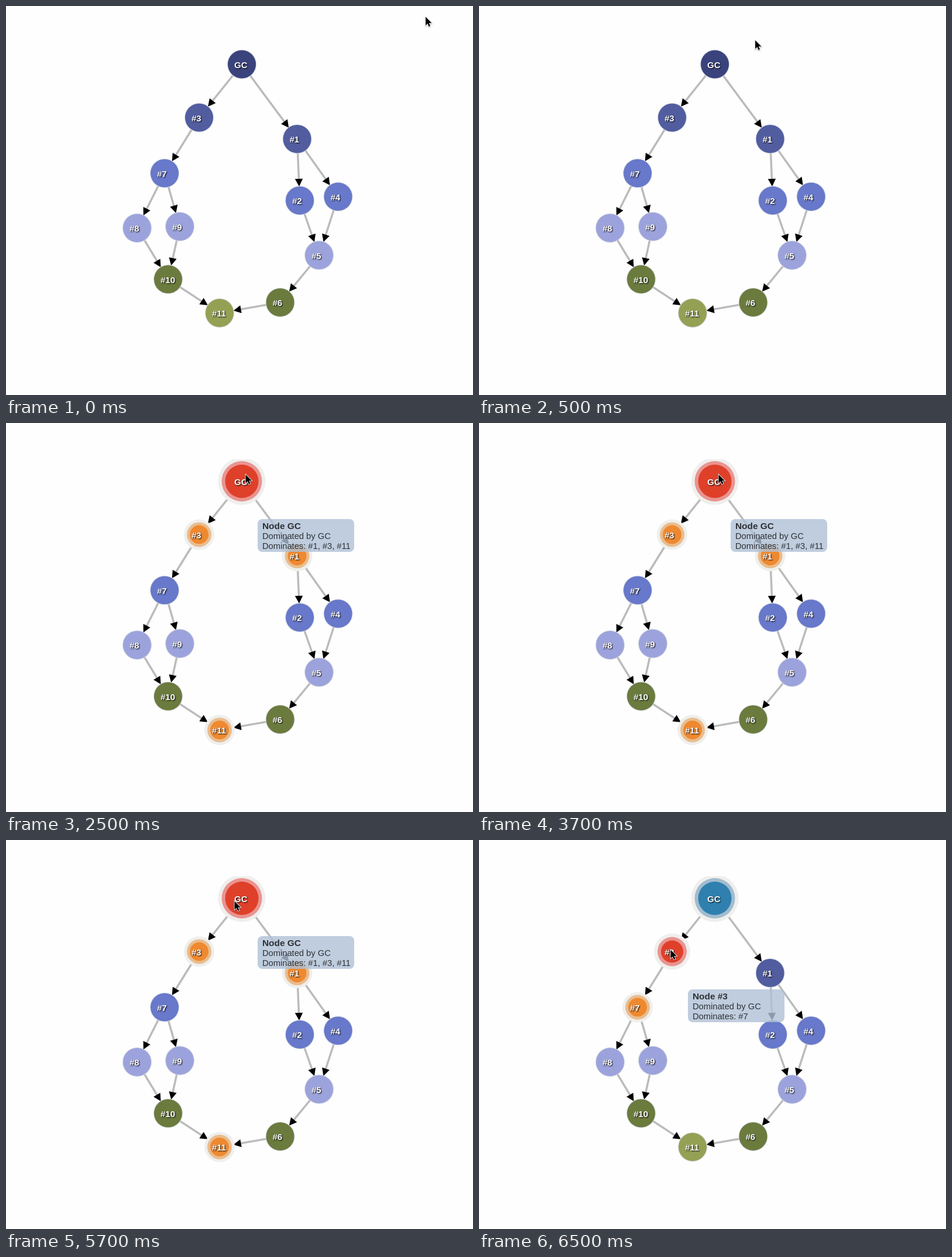
Recreate the animation shown at these times as an HTML page with a canvas. Size 798 by 664 pixels, loop 8000 ms.

```html
<!DOCTYPE html>
<html lang="en">
<head>
<meta charset="utf-8">
<title>Dominator graph</title>
<style>
  html, body { margin: 0; width: 100%; height: 100%; overflow: hidden; background: #fefefe; }
  canvas { display: block; }
</style>
</head>
<body>
<canvas id="stage" width="798" height="664"></canvas>
<script>
const ctx = document.getElementById('stage').getContext('2d');
const TAU = Math.PI * 2, LOOP = 8000, R = 24;
const FONT = '"Liberation Sans", Arial, sans-serif';
const levels = ['#3b437d', '#515d9f', '#6878ca', '#9ca3dc', '#6b7b3d', '#94a154'];

// label: x, y, depth
const nodes = {
  'GC': [403, 99.5, 0], '#1': [497.5, 227, 1], '#3': [330, 190.5, 1],
  '#2': [502, 332, 2], '#4': [567.5, 325.5, 2], '#7': [271, 285.5, 2],
  '#5': [535, 425.5, 3], '#8': [224, 379, 3], '#9': [297, 376.5, 3],
  '#6': [468.5, 506, 4], '#10': [277, 466.5, 4], '#11': [365, 524, 5]
};
const edges = 'GC-#1 GC-#3 #1-#2 #1-#4 #2-#5 #4-#5 #5-#6 #6-#11 #3-#7 #7-#8 #7-#9 #8-#10 #9-#10 #10-#11'
  .split(' ').map(e => e.split('-'));

// highlight: core and ring colours
const RED = ['#df402a', '#e99490'], ORANGE = ['#ef8930', '#e9bd8e'], BLUE = ['#2f80af', '#a2bccf'];
const BIG = [28.5, 34.5, 40.5], MID = [19, 25, 31], SMALL = [16, 21, 26];
const overRoot = {
  lit: { 'GC': [RED, BIG], '#1': [ORANGE, SMALL], '#3': [ORANGE, SMALL], '#11': [ORANGE, SMALL] },
  tip: ['GC', '#1, #3, #11']
};
const overThree = {
  lit: { 'GC': [BLUE, BIG], '#3': [RED, MID], '#7': [ORANGE, SMALL] },
  tip: ['#3', '#7']
};
const idle = { lit: {} };

const steps = [
  { at: 0, cursor: [717, 18.5], view: idle },
  { at: 500, cursor: [472, 58.5], view: idle },
  { at: 2500, cursor: [409.5, 88], view: overRoot },
  { at: 4500, cursor: [390.5, 104.5], view: overRoot },
  { at: 6500, cursor: [327.5, 187.5], view: overThree }
];

function disc(x, y, r, color) {
  ctx.beginPath();
  ctx.arc(x, y, r, 0, TAU);
  ctx.fillStyle = color;
  ctx.fill();
}

function text(str, x, y, font, color) {
  ctx.font = `${font} ${FONT}`;
  ctx.fillStyle = color;
  ctx.fillText(str, x, y);
}

function drawEdge([from, to]) {
  const [x1, y1] = nodes[from], [x2, y2] = nodes[to];
  const len = Math.hypot(x2 - x1, y2 - y1), tip = len - R;
  ctx.save();
  ctx.translate(x1, y1);
  ctx.rotate(Math.atan2(y2 - y1, x2 - x1));
  ctx.fillStyle = '#bbb';
  ctx.fillRect(0, -1.75, tip - 6, 3.5);
  ctx.fillStyle = '#000';
  ctx.beginPath();
  ctx.moveTo(tip, 0);
  ctx.lineTo(tip - 13, -6.7);
  ctx.lineTo(tip - 13, 6.7);
  ctx.fill();
  ctx.restore();
}

function drawNode(label, lit) {
  const [x, y, depth] = nodes[label];
  ctx.save();
  if (lit) {
    const [[core, ring], [r1, r2, r3]] = lit;
    ctx.beginPath();
    ctx.rect(0, 62, 798, 602);
    ctx.clip();
    disc(x, y, r3, '#efefed');
    disc(x, y, r2, ring);
    disc(x, y, r1, core);
  } else {
    disc(x, y, R + 1, '#d3d9e2');
    disc(x, y, R, levels[depth]);
  }
  ctx.shadowColor = '#000';
  ctx.shadowOffsetX = ctx.shadowOffsetY = 1;
  ctx.shadowBlur = 2;
  text(label, x - 13, y + 6, 'bold 15px', '#fff');
  ctx.restore();
}

function drawTip([label, children]) {
  const x = Math.round(nodes[label][0] + 26.5), y = nodes[label][1] + 64.5;
  ctx.beginPath();
  ctx.roundRect(x, y, 165, 56, 8);
  ctx.fillStyle = 'rgba(176, 193, 214, 0.8)';
  ctx.fill();
  text('Node ' + label, x + 8, y + 17, 'bold 15.4px', '#2e3136');
  text('Dominated by GC', x + 8, y + 34, '14.7px', '#2e3136');
  text('Dominates: ' + children, x + 8, y + 51, '14.7px', '#2e3136');
}

function drawCursor([x, y]) {
  ctx.save();
  ctx.translate(x, y);
  const arrow = new Path2D('M0 0V14.5L3.4 11.4L5.6 16.5L8 15.5L5.8 10.5H10.5Z');
  ctx.shadowColor = 'rgba(0, 0, 0, 0.4)';
  ctx.shadowOffsetY = 1;
  ctx.shadowBlur = 2;
  ctx.strokeStyle = '#fff';
  ctx.lineWidth = 1.6;
  ctx.stroke(arrow);
  ctx.shadowColor = 'transparent';
  ctx.fillStyle = '#000';
  ctx.fill(arrow);
  ctx.restore();
}

function draw(t) {
  const { cursor, view } = steps.findLast(s => s.at <= t);
  ctx.fillStyle = '#fefefe';
  ctx.fillRect(0, 0, 798, 664);
  edges.forEach(drawEdge);
  for (const label in nodes) drawNode(label, view.lit[label]);
  if (view.tip) drawTip(view.tip);
  drawCursor(cursor);
}

const start = performance.now();
function frame() {
  draw((performance.now() - start) % LOOP);
  requestAnimationFrame(frame);
}
frame();
</script>
</body>
</html>
```
